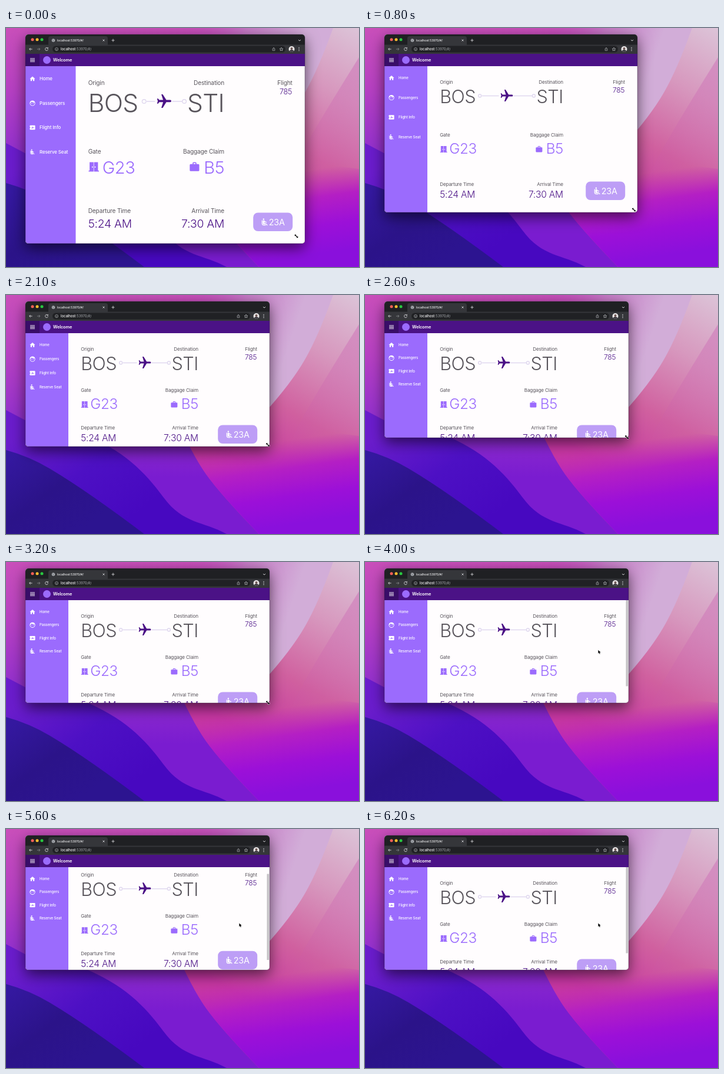
An HTML page with a canvas for the animation above (6300 ms loop, 600 px wide and 407 px high).

```html
<!DOCTYPE html>
<html lang="en">
<head>
<meta charset="utf-8">
<title>Responsive boarding pass</title>
<style>
html, body { margin: 0; width: 100%; height: 100%; overflow: hidden; }
canvas { display: block; }
</style>
</head>
<body>
<canvas id="stage" width="600" height="407"></canvas>
<script>
const ctx = document.getElementById('stage').getContext('2d');
const LOOP = 6300, STEP = 100, LEFT = 33, TOP = 11, BODY = 65;
const DEEP = '#4b1286', VIOLET = '#9b6bfd', GREY = '#58545b', PAPER = '#fffdfe';

// Icons on a 24 unit grid
const ICONS = {
  home: 'M10 20v-6h4v6h5v-8h3L12 3 2 12h3v8z',
  face: 'M12 2a10 10 0 1 0 .01 0zM4 12a8 8 0 0 0 16 0q0-1-.4-2.2C15 10.5 11 8.5 9.2 5.8 8 8.5 6.5 10 4 11.2z' +
    'M9 11.7a1.3 1.3 0 1 0 .01 0zM15 11.7a1.3 1.3 0 1 0 .01 0z',
  ticket: 'M20 4H4a2 2 0 0 0-2 2v4a2 2 0 0 1 0 4v4a2 2 0 0 0 2 2h16a2 2 0 0 0 2-2V6a2 2 0 0 0-2-2z' +
    'M17.7 13.3l-8.8 2.4-1.7-2.9.9-.3 1.3 1 2.4-.6-2.4-4.2 1.4-.4 4 3.8 2.4-.7a1 1 0 0 1 .5 1.9z',
  seat: 'M9 2a2 2 0 1 0 .01 0zM6 16V7H4v9a5 5 0 0 0 5 5h6v-2H9a3 3 0 0 1-3-3zM20 20.1L14.9 15h-3.4v-3.7' +
    'c1.4 1.2 3.6 2.2 5.5 2.2v-2.2c-1.7 0-3.6-.9-4.7-2l-1.4-1.6C10.4 7.2 9.9 7 9.3 7A2.3 2.3 0 0 0 7 9.3V15a3 3 0 0 0 3 3h5.1l3.5 3.5z',
  plane: 'M21 16v-2l-8-5V3.5a1.5 1.5 0 0 0-3 0V9l-8 5v2l8-2.5V19l-2 1.5V22l3.5-1 3.5 1v-1.5L13 19v-5.5l8 2.5z',
  bag: 'M20 6h-4V4a2 2 0 0 0-2-2h-4a2 2 0 0 0-2 2v2H4a2 2 0 0 0-2 2v11a2 2 0 0 0 2 2h16a2 2 0 0 0 2-2V8a2 2 0 0 0-2-2zM14 6h-4V4h4z',
  door: 'M1 22v-2h2V2h8.5v20zM12.5 2H21v18h2v2H12.5zM8 11v2.5h2V11zM14 11v2.5h2V11z',
  star: 'M12 3l2.7 6.2 6.8.6-5.1 4.5 1.5 6.6-5.9-3.5-5.9 3.5 1.5-6.6-5.1-4.5 6.8-.6z',
  share: 'M8 9H5v12h14V9h-3M12 15V2M8 6l4-4 4 4',
  back: 'M21 12H4M11 5l-7 7 7 7',
  forward: 'M3 12h17M13 5l7 7-7 7',
  reload: 'M19 7a8.5 8.5 0 1 0 1.5 6M20 2v6h-6',
  resize: 'M3 3h9L9 6l9 9 3-3v9h-9l3-3-9-9-3 3z',
  arrow: 'M2 1v18l4.3-4 3 7 3.4-1.5-3-6.8H16z'
};
for (const name in ICONS) ICONS[name] = new Path2D(ICONS[name]);

const WIDE = { side: 85.5, label: 10.1, labelY: 96.5, code: 42.5, codeY: 143, lineY: 125, ringL: 95, ringR: 68, ring: 3.3,
  plane: 29, num: 12.6, numY: 112.5, gateY: 214, valueGap: 34, value: 29, iconSize: 19, gateX: 25, bagX: 36, iconUp: 11.5,
  time: 19.3, timeUp: 27.5, timeLabelUp: 52, menu: 7.9, menuY: 86.5, menuStep: 41.5, minStep: 0, baseBottom: 367 };
const COMPACT = { side: 73, label: 8.1, labelY: 95, code: 30.6, codeY: 128, lineY: 115.5, ringL: 68, ringR: 50, ring: 2.5,
  plane: 25, num: 12, numY: 109.5, gateY: 185, valueGap: 28.5, value: 24.3, iconSize: 13, gateX: 17, bagX: 31, iconUp: 7,
  time: 15.6, timeUp: 25.5, timeLabelUp: 45, menu: 6.1, menuY: 85, menuStep: 33.5, minStep: 22.3, baseBottom: 314 };

// Keyframes: time, then values
const CORNER = [[0, 508, 367], [400, 483, 338], [800, 463, 314], [1400, 453, 282], [2100, 448, 258], [2700, 448, 240]];
const POINTER = [[0, 493.5, 354.5], [400, 474, 329], [800, 457, 309.5], [1400, 449, 277], [2100, 445, 255],
  [2700, 445, 239.5], [3300, 445, 239.5], [3800, 397, 150], [4200, 397, 150], [4500, 397, 160.5]];
const SCROLL = [[4300, 0], [4700, 34.5], [5300, 34.5], [5800, 0]];

function at(keys, t) {
  const i = keys.findIndex(k => k[0] > t);
  if (i < 0) return keys[keys.length - 1].slice(1);
  if (i === 0) return keys[0].slice(1);
  const a = keys[i - 1], b = keys[i], p = (t - a[0]) / (b[0] - a[0]);
  return a.slice(1).map((v, n) => v + (b[n + 1] - v) * p);
}

function box(x, y, w, h, fill, r = 0) {
  ctx.fillStyle = fill;
  ctx.beginPath();
  ctx.roundRect(x, y, w, h, r);
  ctx.fill();
}

function disc(x, y, r, fill) {
  box(x - r, y - r, 2 * r, 2 * r, fill, r);
}

function text(str, x, y, size, fill, align = 'left', weight = 400) {
  ctx.font = `${weight} ${size}px Inter, sans-serif`;
  ctx.letterSpacing = `${-.015 * size}px`;
  ctx.textAlign = align;
  ctx.fillStyle = fill;
  ctx.fillText(str, x, y);
}

function icon(name, x, y, size, color, { turn = 0, line = 0 } = {}) {
  ctx.save();
  ctx.translate(x, y);
  ctx.rotate(turn);
  ctx.scale(size / 24, size / 24);
  ctx.translate(-12, -12);
  ctx.fillStyle = ctx.strokeStyle = color;
  ctx.lineWidth = line;
  line ? ctx.stroke(ICONS[name]) : ctx.fill(ICONS[name], 'evenodd');
  ctx.restore();
}

function stroke(d, color, width) {
  ctx.strokeStyle = color;
  ctx.lineWidth = width;
  ctx.stroke(new Path2D(d));
}

function wave(d, [x0, y0, x1, y1], ...colors) {
  const g = ctx.createLinearGradient(x0, y0, x1, y1);
  colors.forEach((c, i) => g.addColorStop(i / (colors.length - 1), c));
  ctx.fillStyle = g;
  ctx.fill(new Path2D(d));
}

function wallpaper() {
  wave('M0 0H600V407H0z', [0, 0, 0, 310], '#c94fba', '#b640c2', '#9430cc', '#7a1cd0');
  wave('M300 0H600V240H300z', [310, 0, 490, 60], '#c04cbc00', '#c67ac6', '#d2add8');
  wave('M556 0H600V407H430Q365 340 340 305T285 200H440Q485 150 508 110T556 0z', [600, 0, 430, 300],
    '#dcc4d8', '#d798be', '#d0609f', '#c636a2');
  wave('M600 50Q550 130 515 190T470 290H600z', [600, 50, 500, 290], '#c85ab066', '#c85ab000');
  wave('M285 200Q315 270 340 305T430 407H600V240z', [400, 258, 420, 400], '#c02ab800', '#b41fc4', '#9c10d8', '#8a10dc');
  wave('M0 196Q35 215 70 232L130 236C200 265 235 300 268 345S335 385 375 407H0z', [60, 210, 200, 390],
    '#6a1ccc', '#4d10c4', '#4708c0');
  wave('M0 264Q40 275 75 296T150 345T235 407H0z', [20, 270, 120, 407], '#34189f', '#2b1389', '#2c1490');
}

function chrome(R) {
  box(LEFT, TOP, R - LEFT, 33, '#1f2023');
  ['#fb5f57', '#fdbc2e', '#28c840'].forEach((c, i) => disc(45 + 8 * i, 19.8, 2.5, c));
  box(72, 14, 101, 16, '#35363a', [4, 4, 0, 0]);
  box(LEFT, 28.5, R - LEFT, 15.5, '#35363a');
  box(79, 30.5, R - 112, 11, '#202124', 5.5);
  disc(80.5, 21, 2.8, '#aeb1b6');
  stroke('M78 20l3 1-1 2M81 18.5l2 2', '#55585d', .7);
  text('localhost:53970/#/', 87, 23, 5.1, '#f0f1f2', 'left', 500);
  stroke('M164.5 19.5l3 3m0-3l-3 3M179.5 21h5m-2.5-2.5v5', '#e2e3e5', .8);
  stroke(`M${R - 11} 20l2 2 2-2`, '#e2e3e5', .9);
  icon('back', 42, 36, 7, '#e8e8ea', { line: 2.8 });
  icon('forward', 55.5, 36, 7, '#8b8c90', { line: 2.8 });
  icon('reload', 69, 36, 7, '#e8e8ea', { line: 2.8 });
  ctx.strokeStyle = '#b5b7ba';
  ctx.lineWidth = .7;
  ctx.beginPath();
  ctx.arc(86, 36, 2.5, 0, 7);
  ctx.stroke();
  box(85.6, 35.6, .8, 1.8, '#b5b7ba');
  text('localhost', 93, 38.2, 6, '#f5f5f6', 'left', 500);
  const host = ctx.measureText('localhost').width;
  text(':53970/#/', 93 + host, 38.2, 6, '#a5a8ac');
  icon('share', R - 53, 36, 6.5, '#c4c6c9', { line: 2.2 });
  icon('star', R - 40, 36, 7.5, '#c4c6c9', { line: 2.2 });
  ctx.save();
  ctx.beginPath();
  ctx.arc(R - 22.5, 36, 5, 0, 7);
  ctx.clip();
  box(R - 28, 31, 11, 11, '#e9e6e6');
  disc(R - 22.5, 35, 2, '#6c5452');
  disc(R - 22.5, 41, 4, '#3d3b42');
  ctx.restore();
  [33.5, 36, 38.5].forEach(y => disc(R - 10, y, .75, '#dddfe1'));
}

function header(R) {
  box(LEFT, 44, R - LEFT, 21, DEEP);
  box(LEFT, 44, 24, 21, '#390d68');
  stroke('M41 52h8M41 54.6h8M41 57.2h8', '#fff', 1.1);
  disc(69.5, 54.5, 6.5, VIOLET);
  text('Welcome', 80, 57.2, 7.3, '#fff', 'left', 600);
}

function sidebar(s, B) {
  box(LEFT, BODY, s.side, B - BODY, VIOLET);
  const step = Math.max(s.minStep, s.menuStep + (B - s.baseBottom) * .17);
  [['home', 'Home'], ['face', 'Passengers'], ['ticket', 'Flight Info'], ['seat', 'Reserve Seat']].forEach(([name, label], i) => {
    const y = s.menuY + step * i;
    icon(name, 45, y, 11, '#fff');
    text(label, 57, y + s.menu * .35, s.menu, '#fff', 'left', 500);
  });
}

function route(s, x, dest) {
  const a = x + s.ringL, b = dest - s.ringR, mid = (a + b) / 2, gap = s.plane / 2 + 1;
  ctx.strokeStyle = '#e0d8ef';
  ctx.lineWidth = 1.4;
  ctx.beginPath();
  ctx.moveTo(a + s.ring + 1, s.lineY);
  ctx.lineTo(mid - gap, s.lineY);
  ctx.moveTo(mid + gap - 2, s.lineY);
  ctx.lineTo(b - s.ring, s.lineY);
  for (const c of [a, b]) {
    ctx.moveTo(c + s.ring, s.lineY);
    ctx.arc(c, s.lineY, s.ring, 0, 7);
  }
  ctx.stroke();
  icon('plane', mid, s.lineY, s.plane, DEEP, { turn: Math.PI / 2 });
}

function pass(s, R, B) {
  const x = LEFT + s.side + 21.2, right = R - 21.3, dest = x + (right - x) * 2 / 3;
  const bottom = Math.max(B, 274), gate = s.gateY + (bottom - s.baseBottom) / 2, value = gate + s.valueGap;
  const pair = (l, r, y, size, fill, weight) => {
    text(l, x, y, size, fill, 'left', weight);
    text(r, dest, y, size, fill, 'right', weight);
  };
  pair('Origin', 'Destination', s.labelY, s.label, GREY);
  pair('BOS', 'STI', s.codeY, s.code, GREY, 350);
  route(s, x, dest);
  text('Flight', right, s.labelY, s.label, GREY, 'right');
  text('785', right - .5, s.numY, s.num, DEEP, 'right', 350);

  pair('Gate', 'Baggage Claim', gate, s.label, GREY);
  text('G23', x + s.gateX - 1, value, s.value, VIOLET, 'left', 350);
  text('B5', dest, value, s.value, VIOLET, 'right', 350);
  icon('door', x + s.iconSize / 2, value - s.iconUp, s.iconSize, VIOLET);
  icon('bag', dest - s.bagX - s.iconSize * .77, value - s.iconUp, s.iconSize * 1.02, VIOLET);

  pair('Departure Time', 'Arrival Time', bottom - s.timeLabelUp, s.label, GREY);
  pair('5:24 AM', '7:30 AM', bottom - s.timeUp, s.time, DEEP, 350);
  box(right - 66.5, bottom - 52.5, 67, 31.5, '#bd9ef6', 8);
  icon('seat', right - 47, bottom - 36.5, 15, '#fff');
  text('23A', right - 40, bottom - 31.5, 14.4, '#fff');
}

function draw(t) {
  const [R, B] = at(CORNER, t), [px, py] = at(POINTER, t), [scroll] = at(SCROLL, t);
  const style = R - LEFT > 450 ? WIDE : COMPACT;
  wallpaper();

  ctx.save();
  ctx.shadowColor = 'rgba(0,0,0,.6)';
  ctx.shadowBlur = 24;
  ctx.shadowOffsetY = 8;
  box(LEFT, TOP, R - LEFT, B - TOP, PAPER, 5);
  ctx.restore();

  ctx.save();
  ctx.beginPath();
  ctx.roundRect(LEFT, TOP, R - LEFT, B - TOP, 5);
  ctx.clip();
  box(LEFT, TOP, R - LEFT, B - TOP, PAPER);
  ctx.save();
  ctx.translate(0, -scroll);
  pass(style, R, B);
  ctx.restore();
  if (t >= 3700) {
    const view = B - BODY, ratio = view / (274 - BODY);
    box(R - 4.5, BODY + scroll * ratio, 3.5, view * ratio, '#c5c3c6');
  }
  sidebar(style, B);
  chrome(R);
  header(R);
  ctx.restore();

  ctx.strokeStyle = 'rgba(40,30,50,.55)';
  ctx.lineWidth = .6;
  ctx.beginPath();
  ctx.roundRect(LEFT, TOP, R - LEFT, B - TOP, 5);
  ctx.stroke();

  const resizing = t < 3400;
  const [name, x, y] = resizing ? ['resize', px, py] : ['arrow', px + 2.5, py + 3.5];
  icon(name, x, y, 7.5, '#fff', { line: 2.5 });
  icon(name, x, y, 7.5, '#000');
}

function tick() {
  draw(Math.floor(performance.now() % LOOP / STEP) * STEP);
  requestAnimationFrame(tick);
}
tick();
</script>
</body>
</html>
```
